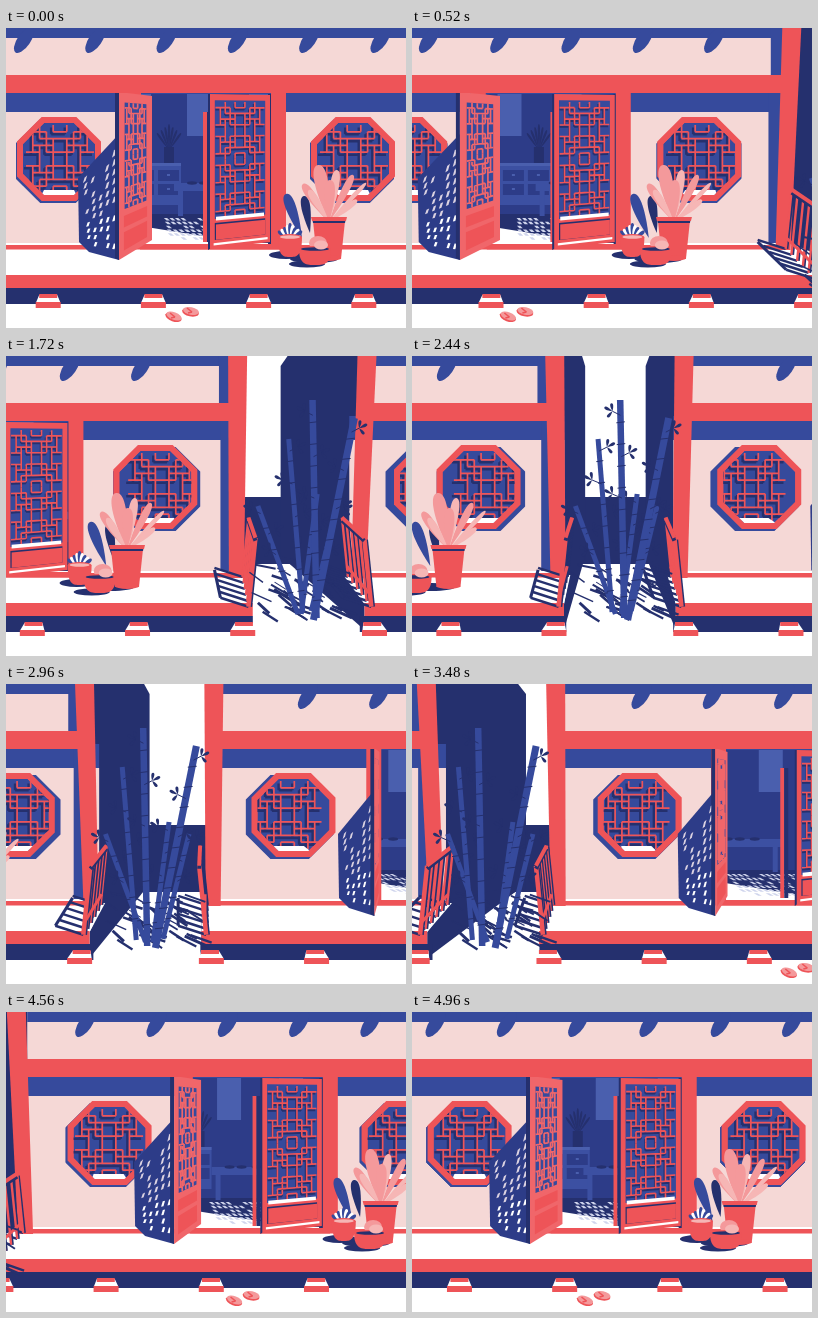
An HTML page with a canvas that plays this animation: 400 px wide and 300 px high, repeating every 5000 ms.

```html
<!DOCTYPE html>
<html lang="en">
<head>
<meta charset="utf-8">
<title>Courtyard house</title>
<style>
html, body { margin: 0; width: 100%; height: 100%; overflow: hidden; background: #fff; }
canvas { display: block; width: 400px; height: 300px; }
</style>
</head>
<body>
<canvas id="stage" width="400" height="300"></canvas>
<script>
const g = document.getElementById('stage').getContext('2d');
const LOOP = 5000, STEP = 40, PERIOD = 569;
const RED = '#ee5458', PINK = '#f5d8d6', SALMON = '#f4999b', PALE = '#f6b6b5',
      BLUE = '#364a9c', NAVY = '#25306e', DEEP = '#2d3c88', WHITE = '#fff';
let cam = 0;

// x is measured from the house centre on screen; k is the parallax of its depth
const sx = (x, k) => 200 + x - k * cam;
const pt = ([x, y, k]) => [sx(x, k), y];
const floorY = k => 39 + 181 * k;
const rand = n => { const s = Math.sin(n * 127.1) * 43758.5; return s - Math.floor(s); };

function rect(fill, x, y, w, h, k) {
  g.fillStyle = fill;
  g.fillRect(sx(x, k), y, w, h);
}
function trace(pts) {
  g.beginPath();
  pts.forEach(p => g.lineTo(p[0], p[1]));
  g.closePath();
}
function poly(fill, pts) {
  trace(pts.map(pt));
  g.fillStyle = fill;
  g.fill();
}
function line(color, width, a, b) {
  g.strokeStyle = color;
  g.lineWidth = width;
  g.beginPath();
  g.moveTo(...a);
  g.lineTo(...b);
  g.stroke();
}
function oval(fill, x, y, rx, ry, k, turn = 0) {
  g.fillStyle = fill;
  g.beginPath();
  g.ellipse(sx(x, k), y, rx, ry, turn, 0, 7);
  g.fill();
}
function leaf(fill, x, y, tx, ty, w, k) {
  const a = sx(x, k), b = sx(tx, k), d = Math.hypot(tx - x, ty - y);
  const nx = (ty - y) / d * w, ny = (x - tx) / d * w;
  const mx = a + (b - a) * .62, my = y + (ty - y) * .62;
  g.fillStyle = fill;
  g.beginPath();
  g.moveTo(a, y);
  g.bezierCurveTo(mx + nx, my + ny, b + nx, ty + ny, b, ty);
  g.bezierCurveTo(b - nx, ty - ny, mx - nx, my - ny, a, y);
  g.fill();
}

// Maps u,v in 0..1 onto a four-cornered face
function face(tl, tr, br, bl) {
  const [a, b, c, d] = [tl, tr, br, bl].map(pt);
  return (u, v) => [0, 1].map(i =>
    (a[i] * (1 - u) + b[i] * u) * (1 - v) + (d[i] * (1 - u) + c[i] * u) * v);
}
function patch(fill, map, u0, v0, u1, v1, skew = 0) {
  trace([map(u0 + skew, v0), map(u1 + skew, v0), map(u1, v1), map(u0, v1)]);
  g.fillStyle = fill;
  g.fill();
}

// One quarter of the fretwork on a grid of fifths, mirrored both ways
const FRET = [[0, 1, 2, 1], [1, 0, 1, 3], [1, 2, 4, 2], [2, 1, 2, 4], [3, 0, 3, 2], [3, 1, 5, 1],
  [0, 3, 3, 3], [3, 3, 3, 5], [4, 1, 4, 4], [2, 4, 5, 4], [0, 4, 1, 4], [1, 4, 1, 5]];
function fret(color, width, map) {
  g.strokeStyle = color;
  g.lineWidth = width;
  g.beginPath();
  for (const [a, b, c, d] of FRET)
    for (const s of [-.2, .2]) for (const t of [-.2, .2]) {
      g.moveTo(...map(s * a, t * b));
      g.lineTo(...map(s * c, t * d));
    }
  g.stroke();
}
function doorFret(map, u0, v0, u1, v1, color, width) {
  const mid = (v0 + v1) / 2, half = (v1 - v0) / 4;
  for (const cv of [mid - half, mid + half])
    fret(color, width, (u, v) => map((u0 + u1) / 2 + u * (u1 - u0) / 2, cv + v * half));
}

function octagon(x, y, r, k) {
  const c = r * .414;
  return [[-c, -r], [c, -r], [r, -c], [r, c], [c, r], [-c, r], [-r, c], [-r, -c]]
    .map(([a, b]) => [x + a, y + b, k]);
}
function windowAt(x) {
  for (let k = .99; k < 1.01; k += .004) poly(BLUE, octagon(x - 1, 133, 42, k));
  poly(RED, octagon(x, 131, 42, 1.01));
  const hole = octagon(x, 131, 36, 1.01);
  g.save();
  trace(hole.map(pt));
  g.clip();
  poly(BLUE, hole);
  const map = (dx, dy) => (u, v) => [sx(x + 1 + dx + u * 34, .98), 131 + dy + v * 34];
  fret(NAVY, 2.6, map(-2, 2.5));
  fret(RED, 1.7, map(0, 0));
  poly(WHITE, [[x - 15, 162, .99], [x + 15, 162, .99], [x + 18, 168, 1.01], [x - 18, 168, 1.01]]);
  g.restore();
}

function interior() {
  g.save();
  g.beginPath();
  g.rect(sx(-66, 1), 66, 132, 149);
  g.clip();
  rect(DEEP, -66, 66, 132, 149, 1);
  for (const x of [-79, -19, 43]) rect('#4a5fae', x, 66, 24, 42, .6);
  rect(NAVY, -120, 186, 240, 30, .8);
  rect('#3c50a2', -77, 135, 52, 42, .61);
  rect('#4a5fae', -77, 135, 52, 3, .61);
  for (const x of [-73, -48]) for (const y of [142, 156]) {
    rect(DEEP, x, y, 21, 11, .61);
    rect('#4a5fae', x + 9, y + 4, 3, 2, .61);
  }
  for (let i = -3; i < 4; i++) leaf(NAVY, -37, 122, -37 + i * 4, 96 + Math.abs(i) * 3, 1.5, .61);
  rect(NAVY, -42, 119, 10, 16, .61);
  rect('#3c50a2', -32, 155, 72, 8, .75);
  for (const x of [-28, 31]) rect('#3c50a2', x, 163, 5, 25, .75);
  for (const x of [-14, -2, 13]) oval(NAVY, x, 155, 5, 1.7, .75);
  poly(WHITE, [[-66, 198, 1], [-66, 215, 1], [40, 215, 1]]);
  const mat = face([-40, 190, .9], [32, 190, .9], [44, 213, .98], [-34, 213, .98]);
  for (let r = 0; r < 6; r++) for (let c = 0; c < 13; c++)
    if (rand(r * 13 + c + 4) > .3) patch('#cfd4ec', mat, c / 13, r / 6, c / 13 + .045, r / 6 + .11, -.03);
  g.restore();
}

function leftDoor() {
  poly(DEEP, [[-87, 106, 1.1], [-128, 150, 1.12], [-127, 214, 1.12], [-117, 224, 1.12], [-87, 232, 1.1]]);
  const cast = face([-126, 150, 1.12], [-87, 112, 1.1], [-88, 230, 1.1], [-120, 222, 1.12]);
  for (let r = 0; r < 11; r++) for (let c = 0; c < 5; c++)
    if (rand(r * 5 + c + 20) > .35)
      patch(r > 6 ? WHITE : '#dcd3e2', cast, .06 + c * .19, .05 + r * .083, .13 + c * .19, .1 + r * .083, .05);
  poly(NAVY, [[-91, 64, 1.1], [-87, 64, 1.1], [-87, 232, 1.1], [-91, 230, 1.1]]);
  const leafFace = face([-87, 64, 1.1], [-54, 68, .98], [-54, 212, .98], [-87, 232, 1.1]);
  patch('#f0666a', leafFace, 0, 0, 1, 1);
  patch(BLUE, leafFace, .17, .06, .83, .71);
  doorFret(leafFace, .17, .06, .83, .71, '#f0666a', 1.7);
  patch(RED, leafFace, .15, .75, .85, .82);
  patch(RED, leafFace, .15, .85, .85, .96);
}
function rightDoor() {
  rect(RED, -3, 84, 4, 130, .99);
  rect(NAVY, 1, 84, 4, 130, .99);
  poly(NAVY, [[2, 66, 1.045], [7, 66, 1.04], [7, 219, 1.04], [2, 222, 1.045]]);
  const leafFace = face([4, 66, 1.045], [64, 67, 1.035], [64, 214, 1.035], [4, 221, 1.045]);
  patch(RED, leafFace, 0, 0, 1, 1);
  patch(BLUE, leafFace, .08, .04, .92, .81);
  const inset = (du, dv) => (u, v) => leafFace(u + du, v + dv);
  doorFret(inset(-.02, .012), .11, .05, .91, .8, NAVY, 2);
  doorFret(leafFace, .09, .05, .91, .8, RED, 1.6);
  patch(WHITE, leafFace, .1, .795, .9, .82);
  patch(NAVY, leafFace, .08, .835, .92, .945);
  patch(RED, leafFace, .1, .845, .92, .945);
  patch(WHITE, leafFace, .06, .965, .96, .98);
}

function plants() {
  leaf(BLUE, 96, 210, 80, 166, 7, 1);
  leaf(NAVY, 104, 205, 98, 168, 6, 1);
  oval(NAVY, 108, 231, 24, 4, 1.04);
  oval(NAVY, 80, 227, 17, 4, 1.07);
  oval(NAVY, 101, 236, 18, 3.5, 1.1);
  const k = 1.032;
  for (const [x, y, w, c] of [[160, 155, 3, PALE], [147, 147, 5, SALMON], [97, 156, 6, SALMON],
      [131, 142, 6, PALE], [112, 137, 9, SALMON], [103, 162, 5, PALE], [151, 172, 4, PALE], [124, 152, 7, SALMON]])
    leaf(c, 123, 194, x, y, w, k);
  poly(RED, [[107, 193, k], [139, 193, k], [135, 231, k], [111, 231, k]]);
  oval(RED, 123, 230, 12, 3, k);
  poly(NAVY, [[106, 190, k], [140, 190, k], [139, 195, k], [107, 195, k]]);
  poly(RED, [[105, 189, k], [141, 189, k], [140, 193, k], [106, 193, k]]);
  for (let i = -4; i < 5; i++)
    leaf(i % 2 ? WHITE : BLUE, 84, 213, 84 + i * 3, 195 + Math.abs(i) * 2, 2.5, 1.075);
  bowl(84, 209, 12, 20, 1.075, PALE);
  oval(SALMON, 112, 215, 9, 7, 1.1);
  bowl(109, 221, 16, 16, 1.1, NAVY);
  oval(PALE, 115, 217, 7, 4.5, 1.1);
}
function bowl(x, y, r, h, k, rim) {
  g.fillStyle = RED;
  g.beginPath();
  g.moveTo(sx(x - r, k), y);
  g.bezierCurveTo(sx(x - r, k), y + h, sx(x - r * .5, k), y + h, sx(x, k), y + h);
  g.bezierCurveTo(sx(x + r * .5, k), y + h, sx(x + r, k), y + h, sx(x + r, k), y);
  g.fill();
  oval(RED, x, y, r, 3, k);
  oval(rim, x, y, r - 2, 1.8, k);
}

function railing(s) {
  const top = k => [sx(s * 238 * k, k), 39 + 122 * k];
  const foot = k => [sx(s * 232 * k, k), floorY(k)];
  const between = (k, f) => [0, 1].map(i => top(k)[i] * (1 - f) + foot(k)[i] * f);
  const shift = ([x, y], dx, dy) => [x + dx, y + dy];
  const ks = [0, 1, 2, 3, 4, 5].map(i => 1.005 + i * .033), front = ks[5];
  // cast shadow, to the left on the floor or the ground
  for (const k of ks) line(NAVY, 2.5, foot(k), shift(foot(k), -28, -9));
  line(NAVY, 3, shift(foot(ks[0]), -28, -7), shift(foot(front), -28, -9));
  for (const k of ks) {
    const w = k === front ? 4.5 : 2.4;
    line(NAVY, w, shift(top(k), 1.5, 2), shift(foot(k), 1.5, 0));
    line(RED, w, top(k), foot(k));
  }
  line(NAVY, 4, shift(top(ks[0]), 0, 3), shift(top(front), 0, 3));
  line(RED, 4, top(ks[0]), top(front));
  line(RED, 3, between(ks[0], .82), between(front, .82));
}

function sideWall(s) {
  poly(NAVY, [[s * 239, 0, 1.063], [s * 120, 0, .54], [s * 112, 10, .5], [s * 112, 205, .5], [s * 239, 232, 1.063]]);
  poly(NAVY, [[s * 112, 200, .5], [s * 236, 215, 1], [s * 273, 248, 1.156], [s * 273, 274, 1.156]]);
}
function house() {
  poly(WHITE, [[-236, 219, 1], [236, 219, 1], [273, 248, 1.156], [-273, 248, 1.156]]);
  rect(PINK, -230, 84, 460, 131, 1);
  rect(BLUE, -230, 60, 460, 24, 1);
  rect(BLUE, 218, 60, 14, 155, 1.04);
  rect(WHITE, -230, 215, 460, 2, 1);
  rect(RED, -230, 217, 460, 4.5, 1);
  rect(PINK, -232, 0, 464, 48, 1.063);
  rect(BLUE, -232, 0, 464, 10, 1.063);
  g.save();
  g.beginPath();
  g.rect(sx(-232, 1.063), 0, 464, 48);
  g.clip();
  for (let i = 0; i < 6; i++) oval(BLUE, -182 + i * 71.3, 12, 6.5, 15, 1.223, .6);
  g.restore();
  rect(BLUE, 222, 0, 14, 48, 1.068);
  windowAt(-147);
  windowAt(147);
  interior();
  rect(RED, -66, 216, 140, 5.5, 1);
  rect(NAVY, 62, 66, 4, 150, 1.02);
  for (const x of [-80, 65]) rect(RED, x, 62, 15, 157, 1.035);
  leftDoor();
  rightDoor();
  // the pillars lean towards the viewer at the top
  for (const s of [-1, 1])
    poly(RED, [[s * 244 - 9.5, 0, 1.085], [s * 244 + 9.5, 0, 1.085], [s * 232 + 7.5, 222, 1.03], [s * 232 - 7.5, 222, 1.03]]);
  rect(RED, -248, 47, 496, 18, 1.068);
  plants();
  rect(NAVY, -268, 260, 536, 16, 1.13);
  for (let i = 0; i < 6; i++) {
    const x = -263 + i * 105.2;
    poly(WHITE, [[x - 9, 267, 1.15], [x + 9, 267, 1.15], [x + 12, 274, 1.156], [x - 12, 274, 1.156]]);
    rect(RED, x - 9, 266, 18, 4, 1.15);
    rect(RED, x - 12.5, 274, 25, 6, 1.156);
  }
  rect(RED, -273, 247, 546, 13, 1.156);
  for (const s of [-1, 1]) railing(s);
  slipper(-32, 288, .35);
  slipper(-15, 283, .2);
}
function slipper(x, y, turn) {
  oval(RED, x - .5, y + 1.2, 8.5, 4.2, 1.21, turn);
  oval(SALMON, x, y, 8, 3.8, 1.21, turn);
  const c = sx(x, 1.21);
  line(RED, 1.6, [c - 4, y - 3], [c + 1, y + 1]);
  line(RED, 1.6, [c + 1, y + 1], [c - 3, y + 2]);
}

// Stalks: foot x, foot y, top x, top y, depth, width
const STALKS = [[-4, 258, -44, 150, 1.08, 5], [12, 255, 38, 150, 1.05, 5], [2, 258, 18, 138, 1.05, 5],
  [-8, 256, -22, 83, 1.18, 5], [4, 262, 0, 44, 1.2, 6.5], [8, 264, 49, 62, 1.12, 7]];
function grove() {
  for (let i = 0; i < 40; i++) {
    const x = -48 + rand(i) * 88, y = 208 + rand(i + 50) * 48, a = sx(x, 1.03);
    line(NAVY, 1 + rand(i + 9) * 2, [a, y], [a + 10 + rand(i + 70) * 12, y + 4 + rand(i + 3) * 8]);
  }
  STALKS.forEach(([x0, y0, x1, y1, k, w], n) => {
    const at = f => [sx(x0 + (x1 - x0) * f, k), y0 + (y1 - y0) * f];
    line(BLUE, w, at(0), at(1));
    const joints = Math.round((y0 - y1) / 21);
    for (let j = 1; j < joints; j++) {
      const [x, y] = at(j / joints);
      line(NAVY, 1, [x - w / 2 - 1, y + 1], [x + w / 2 + 1, y]);
    }
    for (let j = 0; j < 3; j++) {
      const f = .55 + j * .19, s = (n + j) % 2 ? 1 : -1;
      const x = x0 + (x1 - x0) * f, y = y0 + (y1 - y0) * f, tx = x + s * (6 + rand(j + n) * 4);
      line(NAVY, 1, at(f), [sx(tx, k), y - 4]);
      for (const [dx, dy] of [[1, -8], [8, -4], [5, 6]]) leaf(NAVY, tx, y - 4, tx + s * dx, y - 4 + dy, 2, k);
    }
  });
}

function draw() {
  const now = Math.floor(performance.now() % LOOP / STEP) * STEP;
  const travel = now / LOOP * PERIOD;
  const place = (x, paint) => { cam = travel - x; paint(); };
  g.fillStyle = WHITE;
  g.fillRect(0, 0, 400, 300);
  place(PERIOD / 2, () => rect(NAVY, -62, 141, 124, 67, .5));
  // only the walls facing the gap are in view
  if (travel > 232) place(0, () => sideWall(1));
  if (travel < PERIOD - 232) place(PERIOD, () => sideWall(-1));
  place(0, house);
  place(PERIOD, house);
  place(PERIOD / 2, grove);
  requestAnimationFrame(draw);
}
draw();
</script>
</body>
</html>
```
